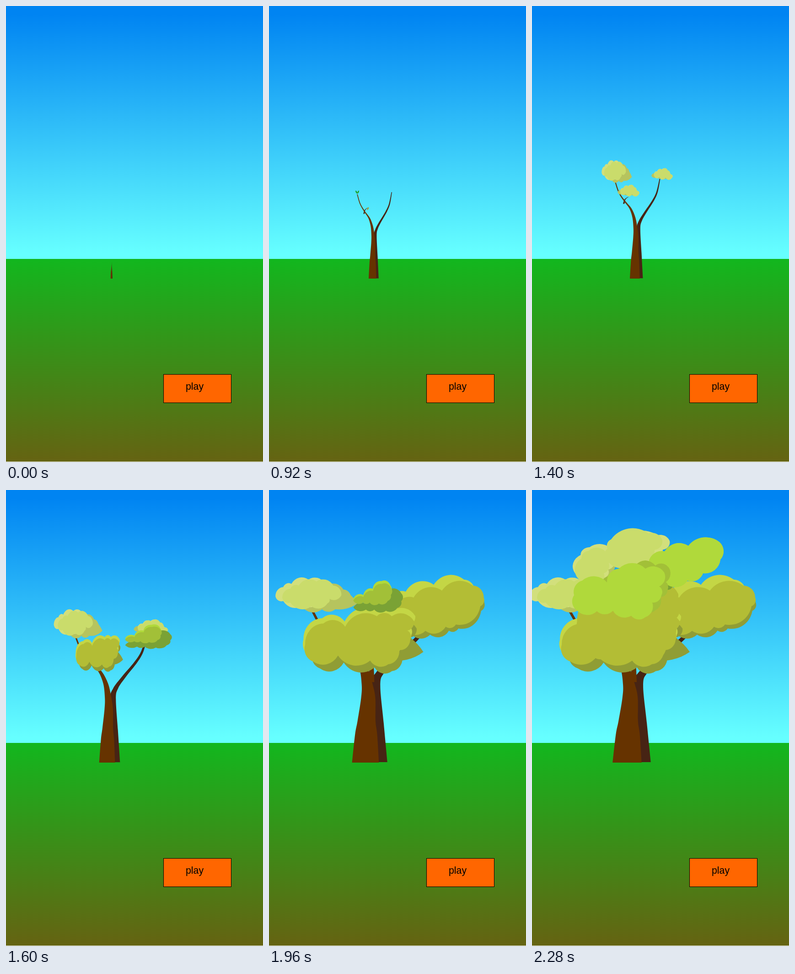
Animation of 562 by 997 pixels, one loop 2.32 s. Source, as an HTML page with a canvas:

```html
<!DOCTYPE html>
<html lang="en">
<head>
<meta charset="utf-8">
<title>Growing tree</title>
<style>
html, body { margin: 0; width: 100%; height: 100%; overflow: hidden; }
canvas { display: block; }
</style>
</head>
<body>
<canvas id="stage" width="562" height="997"></canvas>
<script>
const ctx = document.getElementById('stage').getContext('2d');
const LOOP = 2320, STEP = 40, GROUND = 596;
const HOLDS = [600, 1200, 1720, 1760, 2120];
const ROUND = .7;   // arc radius relative to its chord
const BARK = '#663300', SHADE = '#472414';

// Colours and boxes below are ordered: shade, light, body
const PALE = ['#b6c45e', '#d2df7c', '#cadc6b'];
const OLIVE = ['#909d35', '#c4d645', '#b3bd35'];
const GREEN = ['#7aa235', '#b0d93b', '#a2c038'];

const clamp = v => Math.min(1, Math.max(0, v));

const arc = ([ax, ay], [bx, by]) => {
  const r = Math.hypot(bx - ax, by - ay) * ROUND;
  return `A${r} ${r} 0 0 1 ${bx} ${by}`;
};

const lens = (a, b) => new Path2D(`M${a}${arc(a, b)}${arc(b, a)}`);

// One scalloped outline, fitted into three boxes for its three tones
function cloud(colors, boxes, outline, tail) {
  const d = outline.map((p, i) => arc(p, outline[(i + 1) % outline.length])).join('');
  const body = boxes[2];
  const box = [0, 1, 2, 3].map(i => (i < 2 ? Math.min : Math.max)(...boxes.map(b => b[i])));
  const middle = [(body[0] + body[2]) / 2, (body[1] + body[3]) / 2];
  return { colors, boxes, box, path: new Path2D(`M${outline[0]}${d}Z`), tail: tail && lens(middle, tail) };
}

const left = cloud(PALE, [[35, 205, 176, 263], [-8, 192, 132, 253], [8, 196, 153, 256]],
  [[11, 236], [30, 216], [50, 209], [92, 200], [132, 209], [151, 230], [123, 238], [118, 248], [80, 254], [30, 246]],
  [189, 248]);
const tuft = cloud(PALE, [[312, 230, 440, 251], [328, 222, 445, 248], [328, 222, 456, 253]],
  [[330, 243], [352, 231], [385, 224], [420, 226], [436, 240], [452, 246], [405, 250], [365, 248]]);
const main = cloud(OLIVE, [[78, 280, 332, 401], [57, 252, 329, 376], [61, 264, 326, 386]],
  [[84, 375], [65, 338], [108, 292], [160, 299], [235, 276], [270, 276], [323, 287], [307, 307], [314, 328],
    [288, 350], [262, 381], [219, 373], [143, 362]],
  [345, 354]);
const right = cloud(OLIVE, [[285, 215, 492, 320], [250, 190, 470, 300], [268, 203, 491, 312]],
  [[275, 262], [322, 235], [389, 220], [462, 209], [488, 235], [480, 254], [422, 294], [398, 299], [350, 308], [300, 305]]);
const green = cloud(GREEN, [[135, 178, 341, 269], [135, 148, 295, 235], [135, 159, 297, 241]],
  [[137, 227], [179, 213], [219, 190], [255, 163], [293, 178], [293, 205], [280, 228], [243, 238], [205, 234], [178, 234]]);
const back = cloud(PALE, [[110, 150, 183, 201], [88, 113, 185, 195], [93, 121, 172, 203]],
  [[98, 190], [108, 150], [124, 133], [160, 134], [168, 160], [157, 182], [150, 200]]);
const topmost = cloud(PALE, [[190, 88, 303, 165], [190, 88, 303, 165], [162, 82, 287, 171]],
  [[173, 108], [255, 95], [285, 110], [268, 131], [245, 157], [210, 168], [163, 150], [165, 128]]);
const crownRight = cloud([GREEN[0], GREEN[1], GREEN[1]], [[270, 150, 345, 216], [253, 105, 420, 209], [253, 105, 420, 209]],
  [[255, 158], [290, 134], [342, 122], [410, 114], [412, 152], [374, 182], [340, 198], [296, 207], [270, 185]]);
const crownLeft = cloud([GREEN[2], GREEN[2], GREEN[1]], [[150, 160, 297, 270], [150, 160, 297, 270], [90, 166, 284, 286]],
  [[98, 263], [92, 230], [110, 198], [164, 202], [190, 172], [248, 172], [289, 180], [278, 211], [283, 230],
    [263, 246], [248, 278], [217, 275], [177, 264], [142, 265]]);
const filler = { ...main, colors: Array(3).fill(OLIVE[2]), tail: null };

// Back to front: cloud, born, grown, gone, point it grows from, other box to fill
const foliage = [
  [left, 960, 1400, LOOP, [81, 262]],
  [back, 2120, 2280, LOOP, [140, 190]],
  [topmost, 2120, 2280, LOOP, [230, 160]],
  [tuft, 1200, 1400, 1800, [371, 252]],
  [green, 1400, 1600, 1800, [371, 262], [278, 230, 465, 294]],
  [right, 1760, 1800, LOOP, [371, 254]],
  [tuft, 960, 1400, 1560, [165, 310], [95, 279, 242, 310]],
  [main, 1440, 1680, LOOP, [125, 265]],
  [filler, 2200, 2240, LOOP, [210, 300], [95, 200, 325, 375]],
  [green, 1800, 2080, 2280, [235, 262]],
  [crownRight, 2120, 2280, LOOP, [300, 200]],
  [crownLeft, 2120, 2280, LOOP, [200, 240]]
];

const sprouts = [
  [lens([81, 259], [66, 248]), '#179b17'],
  [lens([81, 259], [96, 248]), '#179b17'],
  [lens([162, 324], [178, 314]), '#a89a2a']
];

// Limb centre lines, from the base to the tip
const trunk = [[208, 596], [209.5, 535], [210.5, 505], [214.5, 455], [212, 425], [202.5, 388], [180, 356],
  [143, 331], [106, 301], [81, 262]];
const fork = [[245, 595], [238, 510], [231.5, 428], [242, 400], [275.5, 369], [322.5, 331], [350, 300], [368.5, 254]];
const twig = [[137, 340], [145, 325], [166, 316]];
const shoot = [[222, 420], [222.5, 385], [221.5, 350]];

// Width of the tree over time
const widths = [[0, .05], [560, .205], [920, .262], [1400, .341], [1600, .547], [1680, .771], [1800, .771], [2040, 1]];

function widthAt(t) {
  const i = widths.findIndex(k => k[0] > t);
  if (i < 0) return 1;
  const [t0, a] = widths[i - 1], [t1, b] = widths[i];
  return a + (b - a) * (t - t0) / (t1 - t0);
}

function curve(points) {
  for (let i = 0; i < points.length - 1; i++) {
    const b = points[i], c = points[i + 1], a = points[i - 1] || b, d = points[i + 2] || c;
    ctx.bezierCurveTo(b[0] + (c[0] - a[0]) / 6, b[1] + (c[1] - a[1]) / 6,
      c[0] - (d[0] - b[0]) / 6, c[1] - (d[1] - b[1]) / 6, ...c);
  }
}

// Draws the first `reach` segments; width falls from base to tip
function limb(points, color, reach, base, tip, flare) {
  if (reach <= 0) return;
  const n = points.length - 1, rows = [];
  for (let i = 0; i <= n && i < reach + 1; i++) {
    const u = Math.min(i, reach), a = points[Math.max(0, i - 1)], b = points[i], f = u - i + 1;
    const half = (tip + (base - tip) * (1 - u / n) ** flare) / 2 * clamp((reach - u) / 2);
    rows.push([a[0] + (b[0] - a[0]) * f, a[1] + (b[1] - a[1]) * f, half]);
  }
  const side = sign => rows.map(([x, y, half]) => [x + sign * half, y]);
  const l = side(-1), r = side(1).reverse();
  ctx.beginPath();
  ctx.moveTo(...l[0]);
  curve(l);
  ctx.lineTo(...r[0]);
  curve(r);
  ctx.fillStyle = color;
  ctx.fill();
}

function paint(path, color) {
  ctx.fillStyle = color;
  ctx.fill(path);
}

function fit(from, to) {
  ctx.translate(to[0], to[1]);
  ctx.scale((to[2] - to[0]) / (from[2] - from[0]), (to[3] - to[1]) / (from[3] - from[1]));
  ctx.translate(-from[0], -from[1]);
}

function drawCloud({ colors, boxes, box, path, tail }, size, [x, y], place = box) {
  ctx.save();
  ctx.translate(x, y);
  ctx.scale(size, size);
  ctx.translate(-x, -y);
  fit(box, place);
  if (tail) paint(tail, colors[0]);
  boxes.forEach((b, i) => {
    ctx.save();
    fit(boxes[2], b);
    paint(path, colors[i]);
    ctx.restore();
  });
  ctx.restore();
}

function band(y0, y1, from, to, g0, g1) {
  const g = ctx.createLinearGradient(0, g0, 0, g1);
  g.addColorStop(0, from);
  g.addColorStop(1, to);
  ctx.fillStyle = g;
  ctx.fillRect(0, y0, 562, y1 - y0);
}

function scene() {
  band(0, 553, '#0084f2', '#66ffff', 18, 540);
  band(553, 997, '#12b71e', '#646412', 553, 990);
  ctx.fillStyle = '#e6e6d8';
  ctx.fillRect(0, 996, 562, 1);
  ctx.fillStyle = '#ff6600';
  ctx.fillRect(344.5, 805.5, 148, 62);
  ctx.strokeStyle = '#000';
  ctx.strokeRect(344.5, 805.5, 148, 62);
  ctx.fillStyle = '#000';
  ctx.font = '21.3px "Liberation Sans", Arial, sans-serif';
  ctx.fillText('play', 393, 839);
}

function draw(now) {
  let t = Math.floor(now % LOOP / STEP) * STEP;
  while (HOLDS.includes(t)) t -= STEP;
  const sx = widthAt(t), sy = Math.min(1, (sx / .771) ** .55), pivot = 231.5 + 18.3 * sx * sx;
  ctx.setTransform(1, 0, 0, 1, 0, 0);
  scene();
  ctx.setTransform(sx, 0, 0, sy, pivot * (1 - sx), GROUND * (1 - sy));
  limb(fork, SHADE, Math.min(9, 2 + Math.max(0, t - 560) / 50), 29.5, 5, .9);
  limb(twig, SHADE, Math.min(4, (t - 700) / 50), 10, 4, 1);
  if (t > 1800) limb(shoot, BARK, 4, 14, 6, 1);
  limb(trunk, BARK, Math.min(11, 3 + t / 65), 63.5, 6, 1.8);
  if (t > 700 && t < 1000) sprouts.forEach(s => paint(...s));
  for (const [shape, born, grown, gone, root, place] of foliage)
    if (t > born && t < gone) drawCloud(shape, clamp((t - born) / (grown - born)), root, place);
  requestAnimationFrame(draw);
}
requestAnimationFrame(draw);
</script>
</body>
</html>
```
